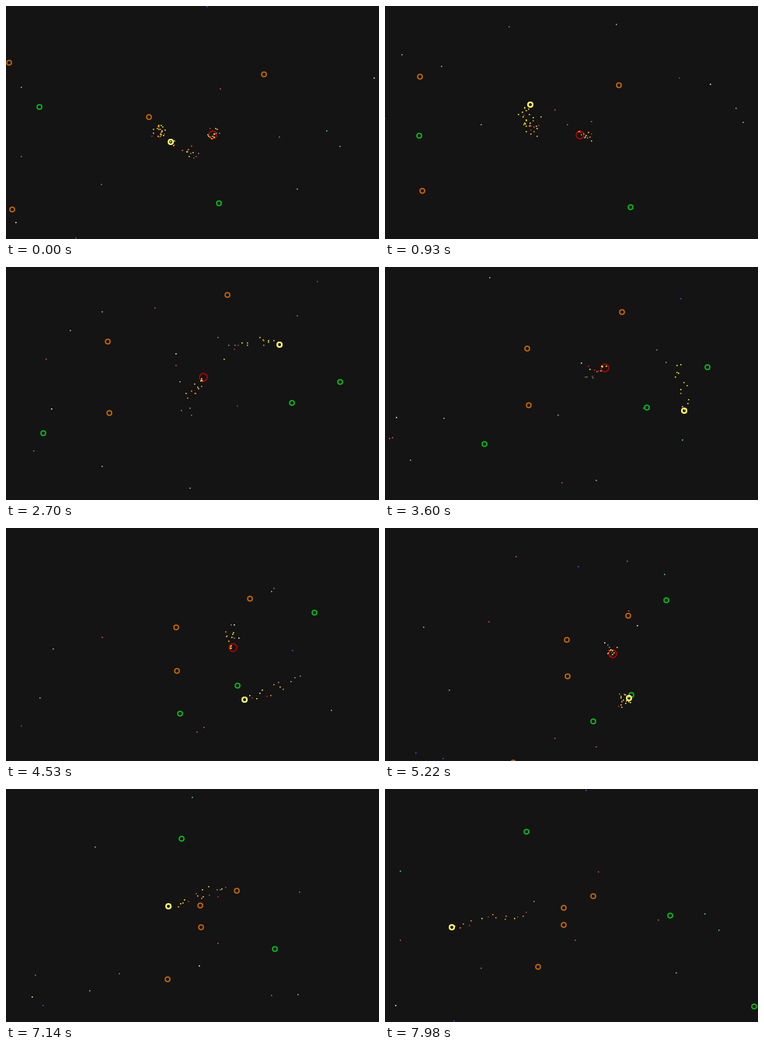
An HTML page with a canvas for the animation above (8000 ms loop, 480 px wide and 300 px high).

```html
<!DOCTYPE html>
<html lang="en">
<head>
<meta charset="utf-8">
<title>Rings and sparks</title>
<style>
  html, body { margin: 0; width: 100%; height: 100%; overflow: hidden; background: #141414; }
  canvas { display: block; width: 480px; height: 300px; }
</style>
</head>
<body>
<canvas id="stage" width="480" height="300"></canvas>
<script>
const ctx = document.getElementById('stage').getContext('2d');
const LOOP = 8, STEP = 0.03, CHASE = 0.265, REACH = 7;
const ORANGE = '#d26900', GREEN = '#00c814', RED = '#c80000', YELLOW = '#ffff6e';
const FIRE = ['#ffff28', '#ffe614', '#ff9614', '#e61e14', '#ffd23c'];
const ASH = ['#8c8c82', '#b44646', '#9696aa', '#64968c'];
const SPARKS = ['#dc5060', '#dc5060', '#5adc8c', '#5adc8c', '#5a46f0', '#f0f0e6'];

// Repeatable noise in 0..1
function noise(n) {
  const s = Math.sin(n * 127.1 + 11.7) * 43758.5453;
  return s - Math.floor(s);
}

const pick = (list, n) => list[Math.floor(noise(n) * list.length)];

// Smooth path through keys of [seconds, x, y]
function place(keys, t) {
  let i = 0;
  while (i < keys.length - 2 && t > keys[i + 1][0]) i++;
  const a = keys[i], b = keys[i + 1], d = b[0] - a[0];
  const before = keys[i - 1] || a, after = keys[i + 2] || b;
  const u = Math.min(1, Math.max(0, (t - a[0]) / d)), w = 1 - u;
  return [1, 2].map(k => {
    const va = (b[k] - before[k]) / (b[0] - before[0]);
    const vb = (after[k] - a[k]) / (after[0] - a[0]);
    return a[k] * w * w * (1 + 2 * u) + b[k] * u * u * (3 - 2 * u) + d * u * w * (va * w - vb * u);
  });
}

const player = [
  [-0.4, 240, 188], [0, 212, 175], [0.5, 186, 155], [0.93, 187, 127], [2.7, 352, 100],
  [3.6, 385, 185], [4.53, 307, 221], [5.3, 314, 216], [5.88, 292, 168], [6.5, 270, 132],
  [7.14, 209, 151], [7.98, 86, 178]
];
const boss = [
  [0, 266, 166], [0.93, 251, 166], [1.7, 234, 178], [2.7, 254, 142],
  [3.6, 283, 130], [4.53, 292, 154], [5.72, 292, 166]
];
const drifters = [
  [[0, 43, 130], [0.93, 44, 167], [2.7, 48, 214], [4.53, 224, 239], [5.88, 299, 250], [7.14, 346, 206], [7.98, 367, 163]],
  [[0, 274, 254], [0.93, 316, 259], [2.7, 368, 175], [4.53, 298, 203], [5.25, 318, 216]],
  [[1.5, 485, 175], [2.7, 430, 148], [4.53, 397, 109], [5.88, 319, 80], [7.14, 226, 64], [7.98, 182, 55]],
  [[7.72, 485, 282], [7.98, 475, 280]]
];

// Steers from a starting point towards the player until they touch
function chase([born, x, y]) {
  const path = [];
  for (let t = born; t < LOOP; t += STEP) {
    path.push([t, x, y]);
    const [px, py] = place(player, t);
    if (Math.hypot(px - x, py - y) < REACH) break;
    x += (px - x) * CHASE * STEP;
    y += (py - y) * CHASE * STEP;
  }
  return path;
}

const chasers = [
  [0, 4, 73], [0, 8, 262], [0, 332, 88], [0, 184, 143], [0.95, 291, -5], [5.1, 160, 305]
].map(chase);

const last = path => path[path.length - 1];
const blasts = [[-0.2, 196, 163], ...[boss, ...drifters, ...chasers].map(last).filter(k => k[0] < 7.9)];

function dot(x, y, color) {
  ctx.fillStyle = color;
  ctx.fillRect(Math.round(x) - 1, Math.round(y) - 1, 1.5, 1.5);
}

function ring(path, t, radius, width, color) {
  if (t < path[0][0] || t > last(path)[0] + STEP / 2) return;
  const [x, y] = place(path, t);
  ctx.strokeStyle = color;
  ctx.lineWidth = width;
  ctx.beginPath();
  ctx.arc(Math.round(x), Math.round(y), radius, 0, 2 * Math.PI);
  ctx.stroke();
}

// Embers shed along a path at a steady rate
function trail(path, t, gap, seed) {
  const end = Math.min(t, last(path)[0]);
  for (let i = Math.ceil((t - 1) / gap); i * gap <= end; i++) {
    const n = seed + i * 7, age = t - i * gap, life = 0.55 + noise(n) * 0.45;
    if (age > life) continue;
    const [x, y] = place(path, i * gap), spread = 6 + age * 20;
    dot(x + (noise(n + 1) - 0.5) * spread, y + (noise(n + 2) - 0.5) * spread,
      pick(age > life * 0.75 ? ASH : FIRE, n + 3));
  }
}

function burst([born, x, y], t) {
  const age = t - born;
  if (age < 0) return;
  for (let i = 0; i < 22; i++) {
    const n = born * 91 + i * 5 + 300;
    if (age > 0.3 + noise(n) * 0.5) continue;
    const a = noise(n + 1) * 2 * Math.PI, r = 2 + age * (8 + noise(n + 2) * 32);
    dot(x + r * Math.cos(a), y + r * Math.sin(a), pick(FIRE, n + 3));
  }
}

// Loose sparks drifting over the whole stage
function sparks(t) {
  for (let i = 0; i < 64; i++) {
    const n = i * 9 + 5, age = (t + LOOP - i * LOOP / 64) % LOOP;
    if (age > 1.2 + noise(n)) continue;
    const a = noise(n + 1) * 2 * Math.PI, v = 25 + noise(n + 2) * 40;
    dot(noise(n + 3) * 480 + v * age * Math.cos(a), noise(n + 4) * 300 + v * age * Math.sin(a),
      pick(SPARKS, n + 5));
  }
}

function draw(t) {
  ctx.fillStyle = '#141414';
  ctx.fillRect(0, 0, 480, 300);
  sparks(t);
  chasers.forEach(path => ring(path, t, 3, 1.5, ORANGE));
  drifters.forEach(path => ring(path, t, 3, 1.5, GREEN));
  ring(boss, t, 5, 1.3, RED);
  ring(player, t, 3, 2, YELLOW);
  trail(boss, t, 0.055, 900);
  trail(player, t, 0.045, 40);
  blasts.forEach(blast => burst(blast, t));
}

function tick() {
  const t = performance.now() / 1000 % LOOP;
  draw(Math.floor(t / STEP) * STEP);
  requestAnimationFrame(tick);
}
tick();
</script>
</body>
</html>
```
